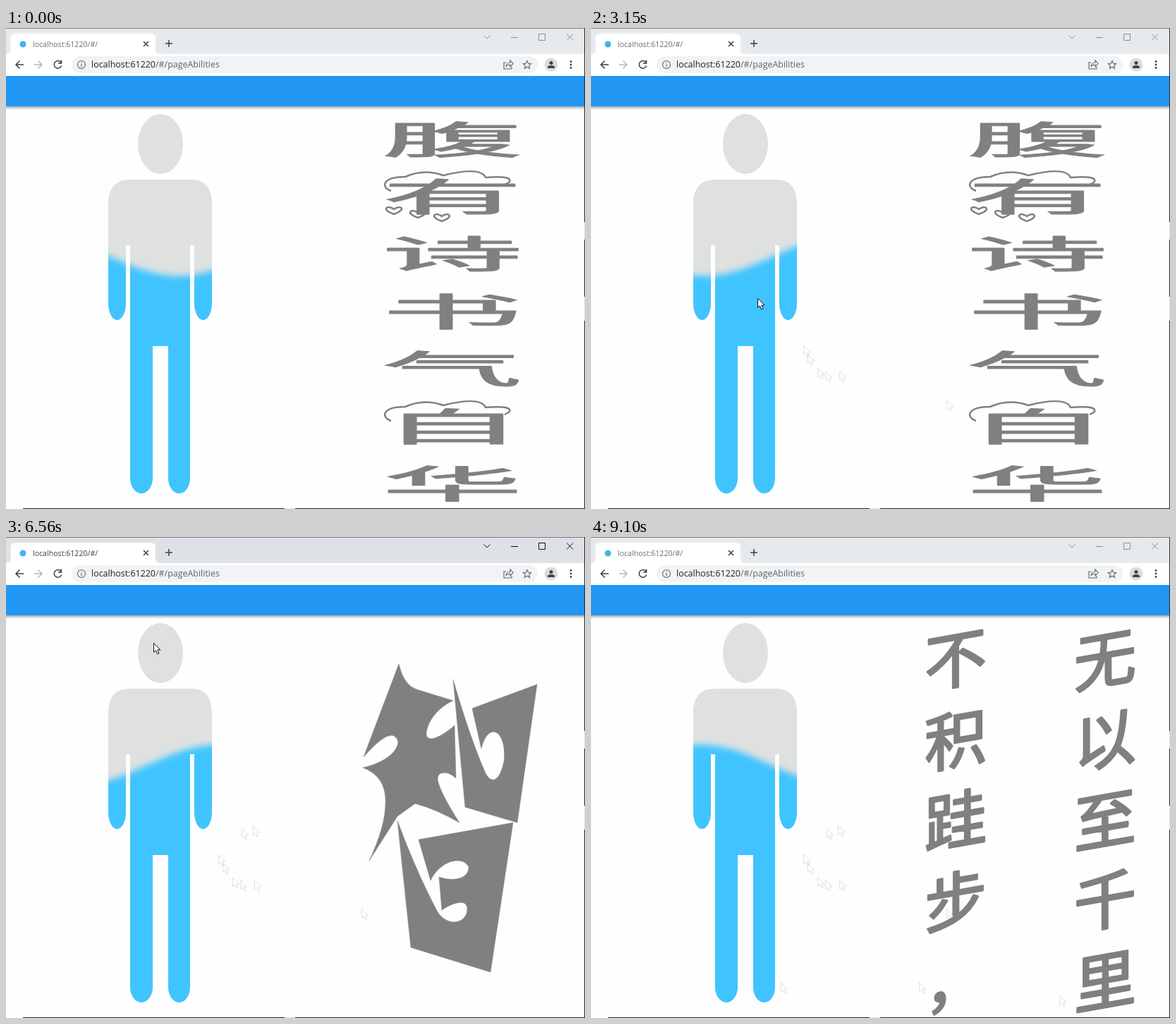
An HTML page for the animation above (9.17 s loop, 821 px wide and 682 px high).

```html
<!DOCTYPE html>
<html lang="zh-CN">
<head>
<meta charset="utf-8">
<title>pageAbilities</title>
<style>
  html, body { margin: 0; width: 100%; height: 100%; overflow: hidden; background: #fefefe; }
  svg { position: absolute; left: 0; top: 0; width: 821px; height: 682px; }
  text { font-family: "Open Sans", "Noto Sans", sans-serif; }
  .icon { fill: none; stroke: #3c4043; stroke-width: 1.5; }
  .thin { fill: none; stroke: #5f6368; stroke-width: 1.1; }
  .win { fill: none; stroke: #8b8e92; }
  .active .win { stroke: #111; }
  #strip { fill: #e7eaed; }
  .active #strip { fill: #dee1e6; }
  #title { fill: #6b6f73; }
  .active #title { fill: #3c4043; }
  .poem { fill: #808080; stroke: #808080; stroke-linejoin: round; }
  .poem text { font-family: "Noto Sans CJK SC", "Noto Sans CJK JP", "Noto Sans CJK", sans-serif; text-anchor: middle; }
  .poem .outline { fill: none; stroke-width: 2.5; }
</style>
</head>
<body>
<svg id="stage" viewBox="0 0 821 682">
  <defs>
    <clipPath id="body">
      <path d="M145 250C145 226 156 215 176 215H262C282 215 292 226 292 250V390A12.500 24 0 0 1 267 390V308H261V638A15.500 22 0 0 1 230 638V451H208V638A16 22 0 0 1 176 638V308H170V390A12.500 24 0 0 1 145 390Z"/>
    </clipPath>
    <filter id="soft" filterUnits="userSpaceOnUse" x="80" y="200" width="280" height="540">
      <feGaussianBlur stdDeviation="4.800"/>
    </filter>
    <linearGradient id="shade" x2="0" y2="1">
      <stop offset="0" stop-color="#000" stop-opacity=".34"/>
      <stop offset="1" stop-color="#000" stop-opacity="0"/>
    </linearGradient>
  </defs>

  <rect id="strip" width="821" height="37"/>
  <path d="M0 37C4 37 6.500 35 6.500 30V15Q6.500 8 14 8H204Q212 8 212 15V30C212 35 214 37 219 37Z" fill="#fff"/>
  <circle cx="24" cy="23" r="4.500" fill="#40b4f0"/>
  <text id="title" x="38" y="26.500" font-size="10.600">localhost:61220/#/</text>
  <path class="icon" d="M195 19l7 7m0-7l-7 7M226 22h10m-5-5v10"/>
  <path class="win" d="M677.500 10.500l4.500 4.500 4.500-4.500M716 13.500h10M755.500 8.500h9v9h-9zM795 8.500l9 9m0-9l-9 9"/>

  <rect y="37" width="821" height="31" fill="#fff"/>
  <rect x="93" y="40" width="661" height="24" rx="12" fill="#f1f3f4"/>
  <path class="icon" d="M25 52H14m5.500-5.500L14 52l5.500 5.500"/>
  <path class="icon" style="stroke:#b5b8bb" d="M40 52h11m-5.500-5.500L51 52l-5.500 5.500"/>
  <path class="icon" d="M78 49a5.300 5.300 0 1 0 .6 4.500M78.500 45.500v4.500H74"/>
  <g class="thin">
    <circle cx="107" cy="52" r="5.500"/>
    <path d="M107 51v4.200M107 48.500v1.300M709 49h-3v9h11v-3M709 55c0-4 3-6 6-6v-3l4 4.500-4 4.500v-3c-3 0-5 1-6 3Z"/>
    <path d="M739 46.500l1.700 3.700 4 .4-3 2.700.9 4-3.600-2.100-3.600 2.100.9-4-3-2.700 4-.4Z"/>
  </g>
  <text x="121" y="56.300" font-size="12.450" fill="#202124">localhost:61220<tspan fill="#5f6368">/#/pageAbilities</tspan></text>
  <circle cx="773" cy="52" r="9.500" fill="#dcdcdf"/>
  <circle cx="773" cy="49.500" r="2.500" fill="#473f42"/>
  <path d="M768 57v-1.500q0-2.500 5-2.500t5 2.500V57Z" fill="#473f42"/>
  <path d="M801 47.500v9.100" stroke="#3c4043" stroke-width="2.800" stroke-linecap="round" stroke-dasharray="0 4.500"/>

  <rect y="111" width="821" height="5" fill="url(#shade)"/>
  <rect y="68" width="821" height="43" fill="#2196f3"/>

  <ellipse cx="219" cy="164.500" rx="32" ry="42.500" fill="#dfe1e1"/>
  <g clip-path="url(#body)">
    <rect x="145" y="215" width="147" height="446" fill="#dfe1e1"/>
    <path id="water" fill="#40c4ff" filter="url(#soft)"/>
  </g>

  <g id="belly" class="poem" stroke-width="1"></g>
  <g id="head" class="poem" stroke-width=".5">
    <path d="M557 180Q564 210 582 216L634 232C612 242 597 262 596 279C597 295 622 280 636 267L638 342C625 330 612 333 612 343Q614 360 643 405Q610 386 580 378L555 396L515 459Q538 410 538 378Q540 340 506 327C530 322 555 308 556 290Q548 265 507 312Z"/>
    <path d="M634 202Q658 285 680 335C688 350 700 348 706 318C711 275 684 259 674 300L661 243L753 209L725 405L651 383Z"/>
    <path d="M555 402Q579 468 609 526C622 555 655 550 654 526C652 513 635 518 618 529L614 482C630 488 656 487 656 468C650 453 618 455 602 487L585 429L719 405L687 617L574 582Z"/>
  </g>
  <g id="legs" class="poem" stroke-width="3"></g>

  <path d="M0 .5H821" stroke="#777a7d"/>
  <path d="M24 681.500H821M820.500 0V682" stroke="#2b2527"/>
  <path d="M820.500 275V300M820.500 381V415M395 681.500h15" stroke="#ddd"/>
  <g id="pointers"></g>
</svg>

<script>
const LOOP = 9170;
const $ = id => document.getElementById(id);

function add(parent, tag, attrs) {
  const el = document.createElementNS('http://www.w3.org/2000/svg', tag);
  for (const name in attrs) el.setAttribute(name, attrs[name]);
  return parent.appendChild(el);
}
const at = (x, y) => `translate(${x} ${y})`;
const toggle = (el, on) => el.setAttribute('visibility', on ? 'visible' : 'hidden');

// A column of characters, each centred on its own origin.
function column(parent, chars, x, y, pitch, size, shape) {
  [...chars].forEach((char, i) => {
    add(parent, 'text', {
      transform: `${at(x, y + i * pitch)} ${shape}`, y: size * 0.38, 'font-size': size
    }).textContent = char;
  });
}

const belly = $('belly'), legs = $('legs');
column(belly, '腹有诗书气自华', 633, 158, 81.4, 54, 'scale(3.7 1)');
column(legs, '不积跬步，', 517, 173, 114, 88, 'skewY(-10)');
column(legs, '无以至千里', 729, 173, 114, 88, 'skewY(-10)');

// Clouds over two of the characters, hearts under one.
for (const y of [239, 565]) {
  add(belly, 'path', {
    class: 'outline', transform: at(633, y),
    d: 'M-87-8C-103-14-98-28-67-28Q-40-40-13-30Q40-43 47-27Q88-30 80-20L74-17'
  });
}
for (let i = 0; i < 3; i++) {
  add(belly, 'path', {
    class: 'outline', transform: at(550 + 34 * i, 259 + 5 * i),
    d: 'M0 5C-20-2-8-9 0-2C8-9 20-2 0 5Z'
  });
}

// Pointer stops: arrival time, x, y. It rests at each and glides to the next.
const stops = [
  [1000, 504, 527], [1070, 352, 486], [1130, 332, 486], [1200, 321, 482], [1270, 307, 462],
  [1500, 301, 450], [1900, 236, 383], [3400, 350, 409], [3550, 334, 413], [3800, 201, 413],
  [4900, 155, 380], [6000, 209, 150], [6900, 225, 270], [7300, 237, 589],
  [7750, 269, 631], [7820, 465, 631], [7890, 664, 650]
];
const GLIDE = 150, EXIT = 7960, BODY_EDGE = 262;

const pointer = (x, y, opacity) => add($('pointers'), 'path', {
  d: 'M.5 .5V13.500L3.500 10.800L5.700 16L8 15L5.800 10H10Z',
  fill: '#fff', stroke: '#111', opacity, transform: at(x, y)
});

// Stops on the bare page leave a faint mark once the pointer moves on.
const marks = stops.flatMap(([, x, y], i) =>
  x > BODY_EDGE ? [{ from: (stops[i + 1] || [EXIT])[0], el: pointer(x, y, 0.12) }] : []);
const cursor = pointer(0, 0, 1);

function moveCursor(t) {
  const i = stops.findLastIndex(stop => stop[0] <= t);
  toggle(cursor, i >= 0 && t < EXIT);
  if (i < 0) return;
  const [t0, x0, y0] = stops[i], [t1, x1, y1] = stops[i + 1] || [LOOP, x0, y0];
  const u = Math.max(0, 1 - (t1 - t) / Math.min(GLIDE, t1 - t0));
  cursor.setAttribute('transform', at(x0 + (x1 - x0) * u, y0 + (y1 - y0) * u));
}

function drawWater(t) {
  const crest = 45 + t * 0.1;
  let d = 'M100 720';
  for (let x = 100; x <= 340; x += 4) {
    d += `L${x} ${(323 - 28.5 * Math.cos((x - crest) * Math.PI / 200)).toFixed(2)}`;
  }
  $('water').setAttribute('d', d + 'V720Z');
}

function render(t) {
  drawWater(t);
  moveCursor(t);
  marks.forEach(mark => toggle(mark.el, t >= mark.from));
  $('stage').classList.toggle('active', t >= 4200 && t < 8550);
  const poem = t < 5200 ? 'belly' : t < 6900 ? 'head' : t < 7430 ? 'belly' : 'legs';
  for (const id of ['belly', 'head', 'legs']) toggle($(id), id === poem);
}

const start = performance.now();
function tick() {
  render((performance.now() - start) % LOOP);
  requestAnimationFrame(tick);
}
tick();
</script>
</body>
</html>
```
